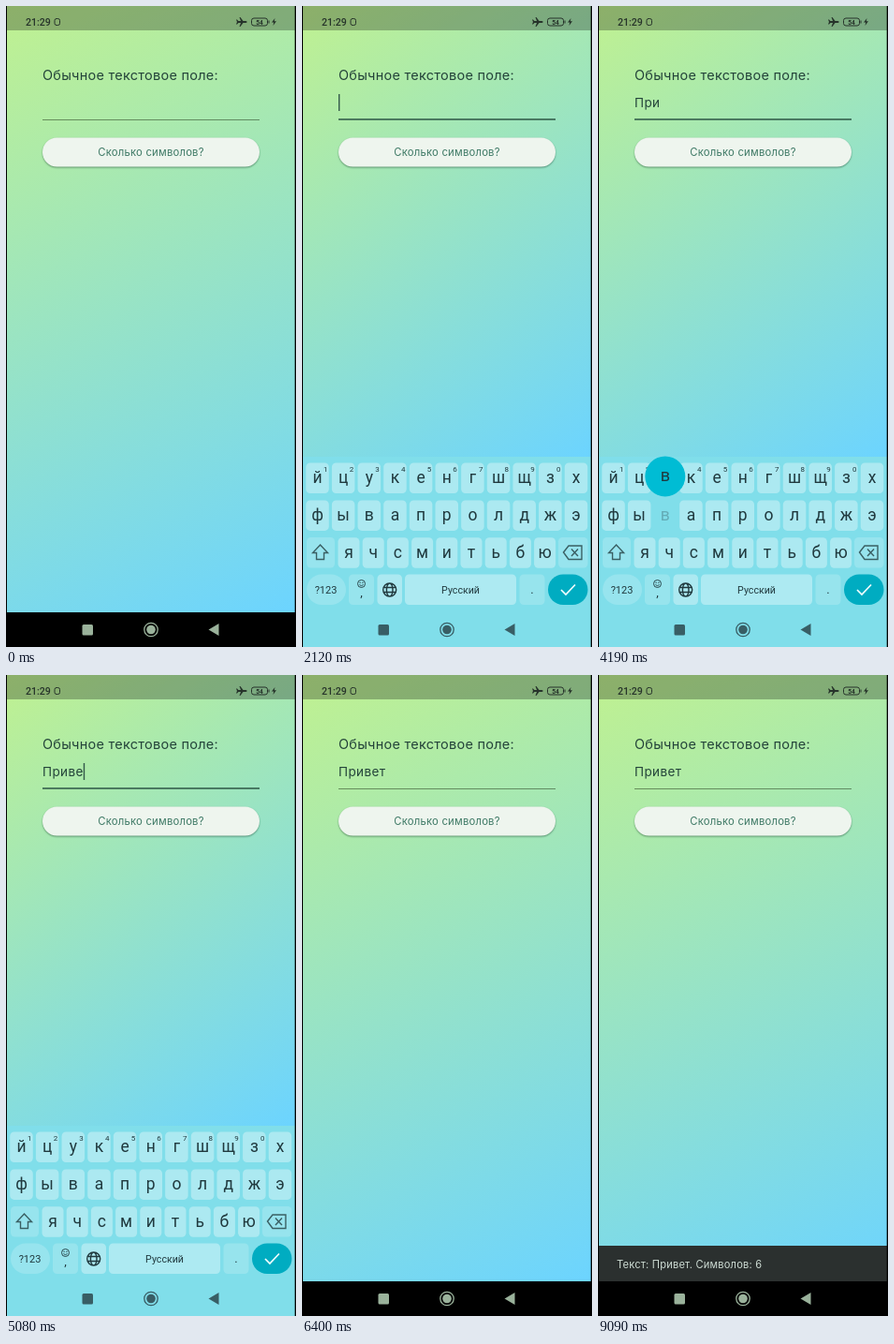
Recreate the animation shown at these times as an HTML page with a canvas. Size 310 by 684 pixels, loop 9.16 s.

```html
<!DOCTYPE html>
<html lang="ru">
<head>
<meta charset="utf-8">
<title>Текстовое поле</title>
<style>
  html, body { margin: 0; width: 100%; height: 100%; overflow: hidden; background: #000; }
  canvas { display: block; width: 310px; height: 684px; }
</style>
</head>
<body>
<canvas id="stage"></canvas>
<script>
const W = 310, H = 684, LOOP = 9160;
const NAV_TOP = 647, KEYBOARD_TOP = 481;
const INK = '#20393e', LABEL = '#24443a';

const canvas = document.getElementById('stage');
const ctx = canvas.getContext('2d');
const dpr = window.devicePixelRatio || 1;
canvas.width = W * dpr;
canvas.height = H * dpr;

// Timeline in ms
const FOCUS = 1050, BLUR = 5900;
const SHOW = 1205, HIDE = 5920, KEYBOARD_MS = 290;
const SNACK = 7400, SNACK_MS = 250;
const CAPS = [2500, 2850];
const TYPED = [['П', 2850], ['р', 3150], ['и', 3600], ['в', 4250], ['е', 4750], ['т', 5360]];
const PRESS_MS = 130;

const ROWS = ['йцукенгшщзх', 'фывапролджэ', 'ячсмитьбю'];
const rowY = row => 503.5 + 39.9 * row;

const within = (t, from, to) => t >= from && t < to;

// cubic-bezier(.4, 0, .2, 1)
function ease(x) {
  if (x <= 0) return 0;
  if (x >= 1) return 1;
  let lo = 0, hi = 1, u = .5;
  for (let i = 0; i < 20; i++) {
    u = (lo + hi) / 2;
    const px = 3 * (1 - u) ** 2 * u * .4 + 3 * (1 - u) * u * u * .2 + u ** 3;
    if (px < x) lo = u; else hi = u;
  }
  return 3 * (1 - u) * u * u + u ** 3;
}

function text(str, x, y, size, color, { font = 'Inter', weight = 400, align = 'left', spacing = 0 } = {}) {
  ctx.font = `${weight} ${size}px ${font}, sans-serif`;
  ctx.letterSpacing = spacing + 'px';
  ctx.textAlign = align;
  ctx.fillStyle = color;
  ctx.fillText(str, x, y);
  return ctx.measureText(str).width;
}

const keyText = (str, x, y, size, color = INK) =>
  text(str, x, y, size, color, { font: 'Roboto', align: 'center' });

function rect(x, y, w, h, color) {
  ctx.fillStyle = color;
  ctx.fillRect(x, y, w, h);
}

function box(x, y, w, h, r, color) {
  ctx.beginPath();
  ctx.roundRect(x, y, w, h, r);
  ctx.fillStyle = color;
  ctx.fill();
}

function disc(x, y, r, color) {
  ctx.beginPath();
  ctx.arc(x, y, r, 0, 7);
  ctx.fillStyle = color;
  ctx.fill();
}

function stroke(d, color, width) {
  ctx.strokeStyle = color;
  ctx.lineWidth = width;
  ctx.stroke(new Path2D(d));
}

function fill(d, color) {
  ctx.fillStyle = color;
  ctx.fill(new Path2D(d));
}

function drawBackground(bottom) {
  const gradient = ctx.createLinearGradient(1, 0, 309, bottom);
  gradient.addColorStop(0, '#c0f190');
  gradient.addColorStop(1, '#6cd4ff');
  rect(0, 0, W, bottom, gradient);
}

function drawStatusBar() {
  rect(0, 0, W, 26, 'rgba(0,0,0,.27)');
  const ink = '#26332a';
  text('21:29', 21, 21, 10.6, ink, { font: 'Roboto', weight: 500 });
  ctx.strokeStyle = ink;
  ctx.lineWidth = 1;
  ctx.beginPath();
  ctx.roundRect(52, 13.5, 5.5, 7, 2);
  ctx.roundRect(262.5, 13, 17, 8, 2.5);
  ctx.stroke();
  rect(280.5, 15.5, 1, 3, ink);
  text('54', 271, 19.6, 6.5, ink, { font: 'Roboto', weight: 700, align: 'center' });
  fill('M258 17 L256.500 16 H253.500 L250.500 12 H249.500 L251 16 H248.500 L247 14.500 H246 L247 17 L246 19.500 H247 L248.500 18 H251 L249.500 22 H250.500 L253.500 18 H256.500Z', ink);
  fill('M287.500 13 L284 17.500 H286.200 L285.500 21 L289 16.300 H286.800Z', ink);
}

function drawForm(t) {
  const focused = within(t, FOCUS, BLUR);
  const typed = TYPED.filter(([, at]) => t >= at);
  text('Обычное текстовое поле:', 39, 78.5, 14.5, LABEL, { spacing: .25 });
  const width = text(typed.map(([ch]) => ch).join(''), 39, 107.8, 13.5, LABEL, { spacing: .4 });

  if (focused) {
    const blinkStart = typed.length ? typed[typed.length - 1][1] : FOCUS;
    if ((t - blinkStart) % 1000 < 500) rect(39 + width, 94, 1.4, 18, '#33594a');
    rect(39, 120.2, 232, 1.6, '#355f4c');
  } else {
    rect(39, 121, 232, 1, 'rgba(30,50,20,.5)');
  }

  ctx.save();
  ctx.shadowColor = 'rgba(0,40,20,.45)';
  ctx.shadowBlur = 2 * dpr;
  ctx.shadowOffsetY = dpr;
  box(39, 140.5, 232, 31, 15.5, '#eef5ee');
  ctx.restore();
  text('Сколько символов?', 155, 160, 11.3, '#3f7a66', { align: 'center', spacing: .2 });
}

function drawNavIcons(color) {
  box(81.5, 660, 11.5, 11.5, 1.5, color);
  disc(155, 665.5, 4.8, color);
  ctx.beginPath();
  ctx.arc(155, 665.5, 7.2, 0, 7);
  ctx.strokeStyle = color;
  ctx.lineWidth = 1.3;
  ctx.stroke();
  fill('M216.500 665.500 L227.500 659 V672Z', color);
}

function drawSnackbar(t) {
  const shown = ease((t - SNACK) / SNACK_MS);
  if (!shown) return;
  const top = NAV_TOP - 38 * shown;
  rect(0, top, W, 38, '#2b302f');
  text('Текст: Привет. Символов: 6', 20, top + 23.5, 11.1, '#cddbd3', { spacing: .2 });
}

const keyX = (row, i) => row < 2 ? 16.5 + 27.65 * i : 50 + 26.2 * i;

function drawLetters(caps, pressed) {
  ROWS.forEach((letters, row) => [...letters].forEach((ch, i) => {
    const x = keyX(row, i), y = rowY(row), w = row < 2 ? 24.5 : 23;
    const held = ch === pressed;
    if (!held) box(x - w / 2, y - 16, w, 32.5, 4.5, 'rgba(255,255,255,.35)');
    keyText(caps ? ch.toUpperCase() : ch, x, y + 5.5, 17.5, held ? 'rgba(32,57,62,.3)' : INK);
    if (row === 0 && i < 10) keyText((i + 1) % 10, x + 8.8, y - 7, 8);
  }));
}

function drawSpecialKeys(caps, t) {
  const pale = 'rgba(255,255,255,.18)', light = 'rgba(255,255,255,.35)';
  box(5, 567, 30, 32.5, 4.5, pale);
  box(274, 567, 31.5, 32.5, 4.5, pale);
  box(5, 606.5, 42, 32.5, 16.2, pale);
  box(50, 606.5, 27, 32.5, 4.5, pale);
  box(80.5, 606.5, 26.5, 32.5, 4.5, light);
  box(110, 606.5, 119, 32.5, 4.5, light);
  box(232.500, 606.5, 27, 32.5, 4.5, pale);
  box(263, 606.5, 42.5, 32.5, 16.2, within(t, 5780, BLUR + 100) ? '#2bb9cb' : '#00acc1');

  const line = '#3a5f63';
  const shift = 'M19.500 575 L27.500 583.500 H23.500 V590.500 H15.500 V583.500 H11.500Z';
  if (caps) fill(shift, line);
  stroke(shift, line, 1.4);
  stroke('M279.500 583 L285 576 H299 V590.500 H285Z M288 579.500 L295 587 M295 579.500 L288 587', line, 1.4);
  keyText('?123', 25.5, 627, 11);
  keyText(',', 63.5, 629.5, 13);
  keyText('.', 246, 627, 13);
  keyText('Русский', 169.5, 626.5, 10.6);

  stroke('M67.500 616.500 a4 4 0 1 1 -8 0 a4 4 0 1 1 8 0 M61.500 617.500 q2 2.400 4 0', INK, .9);
  disc(62.1, 615.4, .6, INK);
  disc(64.9, 615.4, .6, INK);
  stroke('M100.700 623 a7 7 0 1 1 -14 0 a7 7 0 1 1 14 0 M97 623 a3.300 7 0 1 1 -6.600 0 a3.300 7 0 1 1 6.600 0 M87.500 620.500 H100 M87.500 625.500 H100', INK, 1.4);
  stroke('M277 623 L282 628 L292 617.500', '#f2ffff', 1.7);
}

function drawPopup(label, pressed) {
  const row = ROWS.findIndex(letters => letters.includes(pressed));
  const x = keyX(row, ROWS[row].indexOf(pressed)), y = rowY(row) - 41.5;
  disc(x, y, 21.5, '#00bcd4');
  keyText(label, x, y + 5.5, 18);
}

function drawKeyboard(t, shown) {
  const active = TYPED.find(([, at]) => within(t, at - PRESS_MS, at + 20));
  const pressed = active && active[0].toLowerCase();
  const caps = within(t, ...CAPS);
  ctx.save();
  ctx.translate(0, (H - KEYBOARD_TOP) * (1 - shown));
  rect(0, KEYBOARD_TOP, W, H - KEYBOARD_TOP, '#80deea');
  drawLetters(caps, pressed);
  drawSpecialKeys(caps, t);
  if (active) drawPopup(active[0], pressed);
  ctx.restore();
  drawNavIcons(`rgba(40,66,72,${.82 * shown ** 2})`);
}

function draw(t) {
  const shown = ease((t - SHOW) / KEYBOARD_MS) - ease((t - HIDE) / KEYBOARD_MS);
  const keyboardTop = H - (H - KEYBOARD_TOP) * shown;
  ctx.setTransform(dpr, 0, 0, dpr, 0, 0);
  rect(0, 0, W, H, '#000');
  drawBackground(Math.min(NAV_TOP, keyboardTop));
  drawStatusBar();
  drawForm(t);
  drawSnackbar(t);
  rect(0, NAV_TOP, W, H - NAV_TOP, '#000');
  drawNavIcons('#9ab29b');
  if (shown > 0) drawKeyboard(t, shown);
  rect(0, 0, 1, H, '#000');
  rect(308.7, 0, 1.3, H, '#000');
}

const start = performance.now();
function tick() {
  draw((performance.now() - start) % LOOP);
  requestAnimationFrame(tick);
}
tick();
</script>
</body>
</html>
```
